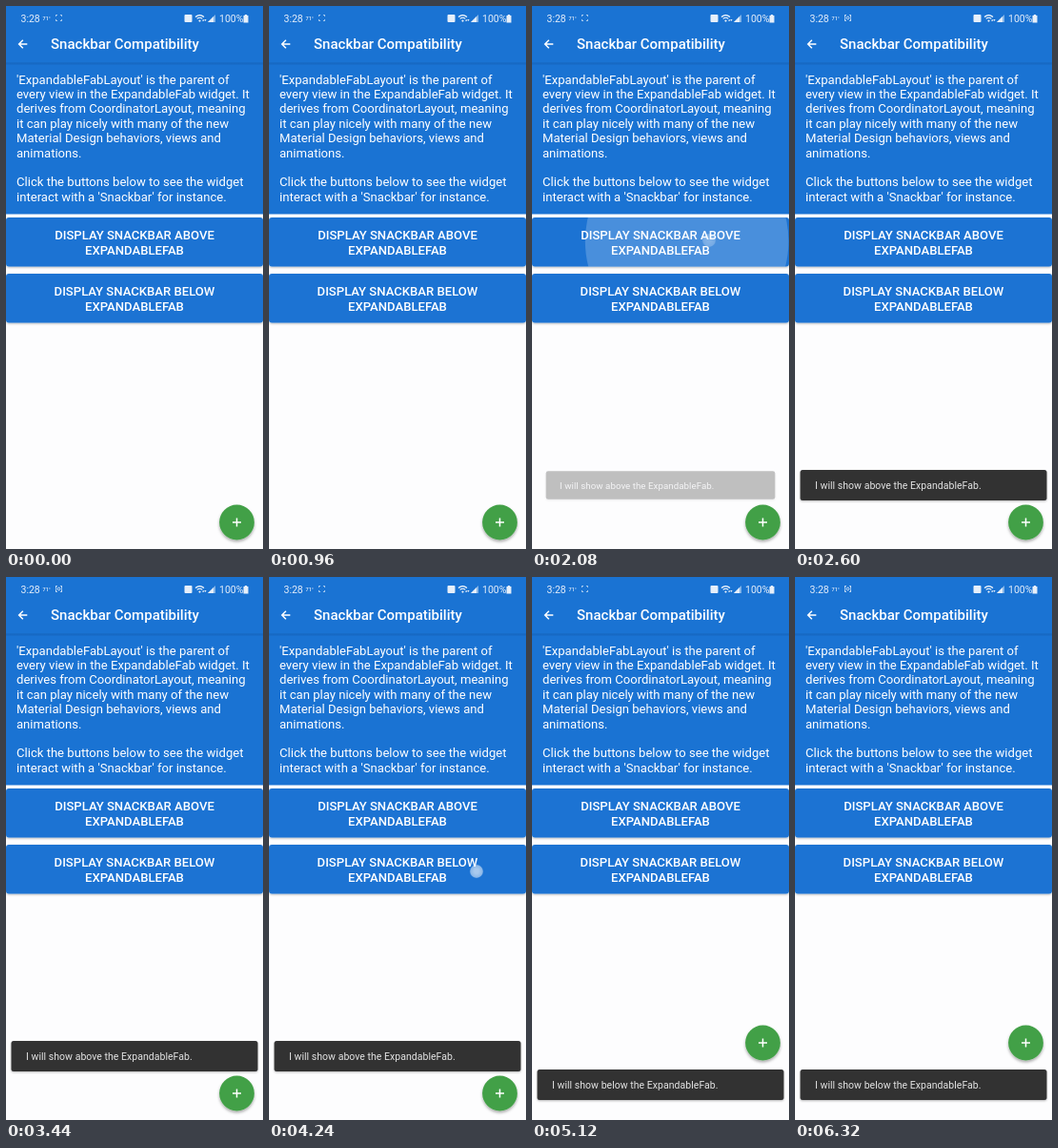
An HTML page for the animation above (6480 ms loop, 270 px wide and 570 px high).

```html
<!DOCTYPE html>
<html lang="en">
<head>
<meta charset="utf-8">
<title>Snackbar Compatibility</title>
<style>
  html, body { margin: 0; width: 100%; height: 100%; overflow: hidden; background: #fdfdfe; }
  svg { display: block; width: 270px; height: 570px; font-family: Roboto, sans-serif; fill: #fff; }
  .blue { fill: #1a73d3; }
  .line { fill: none; stroke: #fff; }
  .body { font-size: 13.1px; }
  .label { font-size: 13.1px; font-weight: 500; text-anchor: middle; }
  .status { font-size: 10.5px; fill: #e6effa; }
  .bar rect { fill: #303032; }
  .bar text { font-size: 10.5px; letter-spacing: .03px; fill: #e4e4e4; }
</style>
</head>
<body>
<svg viewBox="0 0 270 570">
  <defs>
    <filter id="shade" x="-30%" y="-30%" width="160%" height="180%">
      <feDropShadow dx="0" dy="2" stdDeviation="1.8" flood-opacity=".32"/>
    </filter>
    <filter id="low" x="-5%" y="-20%" width="110%" height="150%">
      <feDropShadow dx="0" dy="1" stdDeviation="1" flood-opacity=".28"/>
    </filter>
    <linearGradient id="edge" x2="0" y2="1">
      <stop stop-color="#0d4d98" stop-opacity=".4"/>
      <stop offset="1" stop-color="#0d4d98" stop-opacity="0"/>
    </linearGradient>
    <radialGradient id="touch">
      <stop offset=".3" stop-color="#fff" stop-opacity=".62"/>
      <stop offset=".85" stop-color="#fff" stop-opacity=".5"/>
      <stop offset="1" stop-color="#fff" stop-opacity=".15"/>
    </radialGradient>
    <clipPath id="clip0"><rect y="222" width="270" height="51.5" rx="3"/></clipPath>
    <clipPath id="clip1"><rect y="281" width="270" height="51.5" rx="3"/></clipPath>
  </defs>

  <rect width="270" height="570" fill="#fdfdfe"/>
  <rect class="blue" width="270" height="218.5"/>
  <rect y="59.5" width="270" height="3" fill="url(#edge)"/>

  <g class="status">
    <text x="15.5" y="17">3:28</text>
    <text x="38.5" y="15" font-size="5.5" font-weight="500">71°</text>
    <path class="line" stroke-width=".8" opacity=".8"
      d="M52.5 11v-1.5h1.5M57 9.5h1.5v1.5M58.5 14v1.5h-1.5M54 15.5h-1.5v-1.5"/>
    <g id="blink">
      <path class="line" stroke-width=".8" opacity=".7" d="M52.5 9.5v6M58.5 9.5v6"/>
      <circle cx="55.5" cy="12.5" r="1.4" class="line" stroke-width=".8"/>
    </g>
    <rect x="187.5" y="9" width="8" height="8" rx="1"/>
    <path class="line" stroke-width="1.2" d="M199 11.5q4.5-3.8 9 0M200.7 13.4q2.8-2.3 5.6 0"/>
    <circle cx="203.5" cy="15.6" r="1.1"/>
    <path d="M206 15.8l1.2-2 1.2 2zM208.2 14l1.2 2 1.2-2z"/>
    <path d="M212 17l8-8v8z" opacity=".55"/><path d="M212 17l6-6v6z"/>
    <text x="224" y="17">100%</text>
    <path d="M249.5 10h1.3v-1h2.4v1h1.3v7.5h-5z"/>
  </g>

  <path class="line" stroke-width="1.5" d="M22.3 40h-8.6M17.8 35.8l-4.2 4.2 4.2 4.2"/>
  <text x="47" y="45.4" font-size="15" font-weight="500">Snackbar Compatibility</text>
  <g id="copy" class="body"></g>
  <g id="buttons"></g>
  <g id="bars"></g>
  <g id="fab">
    <circle cx="242.5" cy="542" r="18.4" fill="#43a047" filter="url(#shade)"/>
    <path class="line" stroke-width="1.5" d="M238 542h9M242.5 537.5v9"/>
  </g>
  <g id="dots"></g>
</svg>

<script>
const LOOP = 6480, STEP = 40;
const $ = id => document.getElementById(id);

function add(parent, tag, attrs, text = '') {
  const el = document.createElementNS('http://www.w3.org/2000/svg', tag);
  for (const k in attrs) el.setAttribute(k, attrs[k]);
  el.textContent = text;
  return parent.appendChild(el);
}

const clamp = v => Math.max(0, Math.min(1, v));
const ramp = (t, start, length) => clamp((t - start) / length);

// Cubic bezier easing, solved by bisection.
function bezier(x1, y1, x2, y2) {
  const at = (a, b, u) => 3 * a * u * (1 - u) ** 2 + 3 * b * u * u * (1 - u) + u ** 3;
  return x => {
    let lo = 0, hi = 1;
    for (let i = 0; i < 20; i++) {
      const mid = (lo + hi) / 2;
      if (at(x1, x2, mid) < x) lo = mid; else hi = mid;
    }
    return x <= 0 ? 0 : x >= 1 ? 1 : at(y1, y2, lo);
  };
}
const standard = bezier(.4, 0, .2, 1);
const decelerate = bezier(0, 0, .2, 1);

[
  "'ExpandableFabLayout' is the parent of",
  'every view in the ExpandableFab widget. It',
  'derives from CoordinatorLayout, meaning',
  'it can play nicely with many of the new',
  'Material Design behaviors, views and',
  'animations.',
  '',
  'Click the buttons below to see the widget',
  "interact with a 'Snackbar' for instance."
].forEach((line, i) => add($('copy'), 'text', { x: 11, y: 81.6 + i * 15.4 }, line));

const taps = [
  { word: 'ABOVE', top: 222, x: 186, y: 246, start: 2005, barTop: 487, show: 2035, hide: 4305 },
  { word: 'BELOW', top: 281, x: 218, y: 309, start: 4275, barTop: 517, show: 4380, hide: LOOP }
];

taps.forEach((tap, i) => {
  const buttons = $('buttons');
  add(buttons, 'rect', { class: 'blue', y: tap.top, width: 270, height: 51.5, rx: 3, filter: 'url(#low)' });
  const clip = add(buttons, 'g', { 'clip-path': `url(#clip${i})` });
  tap.ripple = add(clip, 'circle', {});
  add(buttons, 'text', { class: 'label', x: 135, y: tap.top + 23.3 }, 'DISPLAY SNACKBAR ' + tap.word);
  add(buttons, 'text', { class: 'label', x: 135, y: tap.top + 38.8 }, 'EXPANDABLEFAB');

  tap.bar = add($('bars'), 'g', { class: 'bar' });
  add(tap.bar, 'rect', { x: 5.5, y: tap.barTop, width: 259, height: 32, rx: 2.5, filter: 'url(#low)' });
  add(tap.bar, 'text', { x: 21, y: tap.barTop + 19.8 },
    `I will show ${tap.word.toLowerCase()} the ExpandableFab.`);

  tap.dot = add($('dots'), 'circle', { cx: tap.x, cy: tap.y, r: 7.2, fill: 'url(#touch)' });
});

function drawTap(t, { top, x, y, start, barTop, show, hide, ripple, bar, dot }) {
  // The ripple grows from the finger towards the button's centre.
  const p = standard(ramp(t, start, 225));
  ripple.setAttribute('cx', x + (135 - x) * p);
  ripple.setAttribute('cy', y + (top + 25.75 - y) * p);
  ripple.setAttribute('r', 81 + 56.5 * p);
  ripple.setAttribute('opacity', .2 * ramp(t, start, 75) * (1 - ramp(t, start + 225, 150)));

  const scale = .8 + .2 * decelerate(ramp(t, show, 150));
  const cy = barTop + 16;
  bar.setAttribute('transform', `translate(135 ${cy}) scale(${scale}) translate(-135 ${-cy})`);
  bar.setAttribute('opacity', ramp(t, show, 150) * (1 - ramp(t, hide, 75)));

  dot.setAttribute('opacity', t < start - 80 ? 0 : 1 - ramp(t, start, 150));
}

function draw(now) {
  const t = Math.floor(now % LOOP / STEP) * STEP;
  taps.forEach(tap => drawTap(t, tap));
  $('fab').setAttribute('transform', `translate(0 ${t >= taps[1].show ? -53 : 0})`);
  $('blink').setAttribute('opacity', (t + 1008 - 272) % 1008 < 500 ? 1 : 0);
}

let origin;
function tick(now) {
  origin ??= now;
  draw(now - origin);
  requestAnimationFrame(tick);
}
draw(0);
requestAnimationFrame(tick);
</script>
</body>
</html>
```
